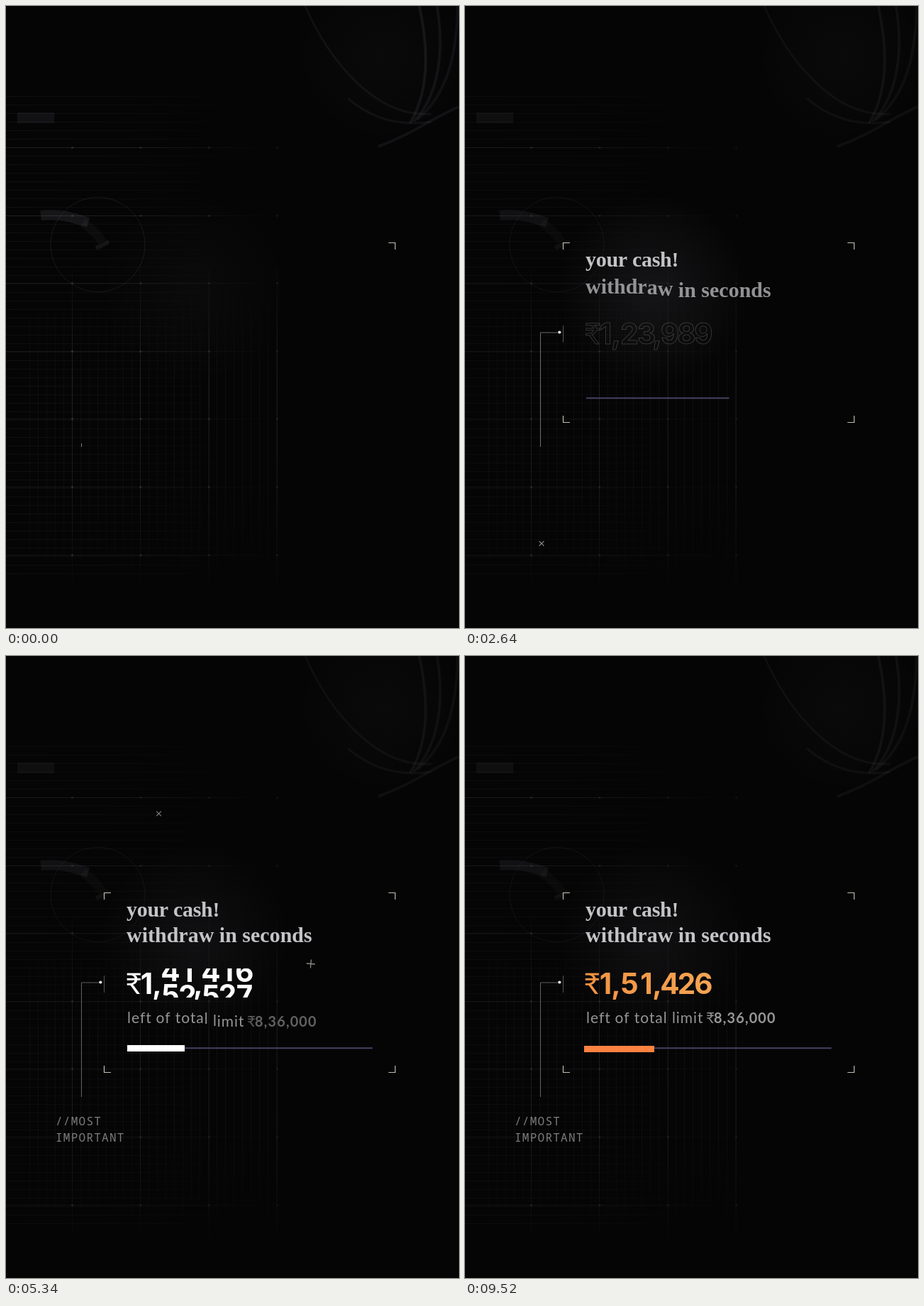
An HTML page with a canvas that plays this animation: 639 by 876 pixels, repeating every 9540 ms.

```html
<!DOCTYPE html>
<html lang="en">
<head>
<meta charset="utf-8">
<title>Withdraw</title>
<style>
html, body { margin: 0; width: 100%; height: 100%; overflow: hidden; background: #050506; }
canvas { display: block; }
</style>
</head>
<body>
<canvas id="stage" width="639" height="876"></canvas>
<script>
const LOOP = 9540, W = 639, H = 876;
const ctx = document.getElementById('stage').getContext('2d');

const SERIF = 'bold 30px "Liberation Serif", serif';
const DIGITS = 'bold 40.5px Inter, sans-serif';
const RUPEE = '41px Lato, "Noto Sans", sans-serif';
const LABEL = '21px Lato, "Noto Sans", sans-serif';
const LABEL_BOLD = 'bold 20px Lato, "Noto Sans", sans-serif';
const MONO = '300 16px "Noto Sans Mono", monospace';

const clamp = v => Math.min(1, Math.max(0, v));
const ramp = (t, start, length) => clamp((t - start) / length);
const easeOut = u => 1 - (1 - u) ** 2;
const easeInOut = u => u < .5 ? 2 * u * u : 1 - 2 * (1 - u) ** 2;
const pulse = (t, peak, width) => clamp(1 - Math.abs(t - peak) / width);
const white = a => `rgba(235,235,245,${a})`;
const mix = (a, b, u) => a.map((v, i) => v + (b[i] - v) * u);
const rgb = c => `rgb(${c.map(Math.round)})`;

function line(points, color, width = 1) {
  ctx.beginPath();
  points.forEach(([x, y]) => ctx.lineTo(x, y));
  ctx.strokeStyle = color;
  ctx.lineWidth = width;
  ctx.stroke();
}

function fade(x0, y0, x1, y1, ...alphas) {
  const g = ctx.createLinearGradient(x0, y0, x1, y1);
  alphas.forEach((a, i) => g.addColorStop(i / (alphas.length - 1), white(a)));
  return g;
}

function drawGlow(x, y, r, alpha) {
  const g = ctx.createRadialGradient(x, y, 0, x, y, r);
  [1, .5, 0].forEach((a, i) => g.addColorStop(i / 2, white(a * alpha)));
  ctx.fillStyle = g;
  ctx.fillRect(x - r, y - r, 2 * r, 2 * r);
}

function drawGrid(k) {
  const rows = fade(0, 0, 330, 0, .03 * k, .022 * k, 0);
  const rowsMajor = fade(0, 0, 390, 0, .06 * k, .05 * k, 0);
  const cols = fade(0, 390, 0, 820, 0, .034, .032, 0);
  const colsMajor = fade(0, 370, 0, 840, .02, .07 * k, .06, 0);
  for (let y = 127.5; y < 800; y += 12) line([[0, y], [330, y]], rows);
  for (let x = 33.5; x < 384; x += 12) line([[x, 390], [x, 820]], cols);
  for (let j = 0; j < 7; j++) {
    const y = Math.round(199 + j * 95.6) + .5;
    line([[0, y], [390, y]], rowsMajor);
    for (let i = 0; i < 4; i++) {
      ctx.fillStyle = white(.07 * k * (1 - i * .15));
      ctx.fillRect(92 + i * 96.4, y - 1.5, 3, 3);
    }
  }
  for (let i = 0; i < 4; i++) {
    const x = Math.round(93 + i * 96.4) + .5;
    line([[x, 370], [x, 840]], colsMajor);
  }
}

function curve(x0, y0, x1, y1, x2, y2, x3, y3, alpha, width) {
  ctx.beginPath();
  ctx.moveTo(x0, y0);
  ctx.bezierCurveTo(x1, y1, x2, y2, x3, y3);
  ctx.strokeStyle = white(alpha);
  ctx.lineWidth = width;
  ctx.stroke();
}

function drawBackdrop(t) {
  ctx.fillStyle = '#050506';
  ctx.fillRect(0, 0, W, H);
  const k = 1.4 - .4 * ramp(t, 0, 1000);
  drawGlow(265, 400, 135, .025 + .075 * ramp(t, 600, 1200) - .05 * ramp(t, 2100, 900));
  drawGrid(k);

  // wire sphere in the top right corner
  drawGlow(530, 72, 120, .02);
  curve(583, 0, 594, 50, 600, 115, 570, 165, .045 * k, 4);
  curve(608, 0, 618, 60, 612, 125, 575, 163, .04 * k, 4);
  curve(637, 0, 636, 70, 622, 125, 580, 160, .035 * k, 4);
  curve(422, 0, 455, 75, 520, 158, 600, 152, .035 * k, 3);
  curve(482, 130, 515, 158, 555, 170, 600, 163, .035 * k, 3);
  curve(639, 142, 605, 155, 575, 180, 525, 198, .04 * k, 4);

  // clock dial and tabs
  ctx.beginPath();
  ctx.arc(129.5, 336, 66.5, 0, 7);
  ctx.strokeStyle = white(.055 * k);
  ctx.lineWidth = 1;
  ctx.stroke();
  ctx.fillStyle = white(.04 * k);
  ctx.fillRect(16, 150, 52, 15);
  curve(49, 295, 80, 292, 97, 299, 116, 305, .05 * k, 14);
  curve(108, 305, 120, 313, 130, 323, 136, 332, .02 * k, 13);
  line([[127, 341], [145, 332]], white(.05 * k), 6);
}

function drawFrame(t) {
  const shown = ramp(t, 400, 500);
  const corner = (x, y, dx, dy, alpha, peak = 0) => {
    const arm = 9.5;
    line([[x + dx * arm, y], [x, y], [x, y + dy * (arm + 11 * peak * (dx < 0))]],
      `rgba(${mix([190, 190, 175], [245, 245, 245], peak)},${alpha})`, 1.2 + peak);
  };
  corner(138.5, 333.5, 1, 1, shown);
  corner(549, 333.5, -1, 1, 1, pulse(t, 2080, 300));
  corner(138.5, 586.5, 1, -1, shown, pulse(t, 4220, 300));
  corner(549, 586.5, -1, -1, shown);

  // pointer: up, then right to the dot
  const up = easeInOut(ramp(t, 0, 1100)), right = easeOut(ramp(t, 1100, 300));
  const tone = 125 - 30 * ramp(t, 2100, 900), gray = rgb([tone, tone, tone]);
  line([[106.5, 621], [106.5, 616 - 156 * up]], gray);
  if (right) line([[106.5, 460], [106.5 + 24 * right, 460]], gray);
  if (t > 1400) {
    ctx.beginPath();
    ctx.arc(133.3, 459.5, 2.1, 0, 7);
    ctx.fillStyle = '#f4f4f4';
    ctx.fill();
  }
  const tick = 12 * easeOut(ramp(t, 2300, 400));
  if (tick) line([[138.5, 462 - tick], [138.5, 462 + tick]], '#55554c');

  const rail = 346 * easeInOut(ramp(t, 1500, 2100));
  if (rail) line([[171, 552.3], [171 + rail, 552.3]], '#47415f', 2);
}

// A plus that turns into a cross, shrinks and fades
function drawSpark(t, x, y, born) {
  const age = t - born;
  if (age < 0 || age > 2300) return;
  const r = 6 - 1.2 * ramp(age, 400, 800);
  ctx.save();
  ctx.translate(x, y);
  ctx.rotate(Math.PI / 4 * easeInOut(ramp(age, 100, 1150)));
  ctx.globalAlpha = ramp(age, 0, 300) * (1 - .8 * ramp(age, 1400, 600)) * (1 - ramp(age, 2050, 250));
  line([[-r, 0], [r, 0]], '#8c8c84', 1.3);
  line([[0, -r], [0, r]], '#8c8c84', 1.3);
  ctx.restore();
}

// Letters wait a little low, then snap up one after another
function drawText(t, str, x, y, font, color, spacing, { at, sweep, fadeTime = 400, lift = 5 }) {
  const alpha = ramp(t, at - 200, fadeTime);
  if (!alpha) return;
  ctx.globalAlpha = alpha;
  ctx.font = font;
  ctx.fillStyle = color;
  ctx.textAlign = 'left';
  [...str].forEach((ch, i) => {
    const up = easeOut(ramp(t, at + sweep * i / str.length, 110));
    const dx = ctx.measureText(str.slice(0, i)).width + i * spacing;
    ctx.fillText(ch, x + dx, y + lift * (1 - up));
  });
  ctx.globalAlpha = 1;
}

function drawHeadings(t) {
  drawText(t, 'your cash!', 170, 367, SERIF, '#c4c4c6', -.3, { at: 1700, sweep: 600, fadeTime: 700 });
  const settle = 2 * (1 - easeOut(ramp(t, 3240, 250)));
  const tone = 200 + 20 * pulse(t, 3240, 500);
  drawText(t, 'withdraw in seconds', 170, 402.5 + settle, SERIF, rgb([tone - 4, tone - 4, tone]), 0,
    { at: 2400, sweep: 600, fadeTime: 600 });
  drawText(t, '//MOST', 70, 661, MONO, '#7c7c7c', 1.25, { at: 3600, sweep: 350 });
  drawText(t, 'IMPORTANT', 70, 684, MONO, '#7c7c7c', 1.25, { at: 3900, sweep: 520 });
  drawText(t, 'left of total limit', 171, 517, LABEL, '#969696', .95, { at: 4900, sweep: 590, fadeTime: 500 });
  drawText(t, '₹', 340, 517, LABEL, '#8f8f8f', 0, { at: 5350, sweep: 50, fadeTime: 300 });
  drawText(t, '8,36,000', 351, 517, LABEL_BOLD, '#979797', 1.1, { at: 5350, sweep: 350, fadeTime: 300 });
}

// Rolling columns: [centre x, final digit, distance at the start]
const COLUMNS = [[232, 5, -3], [256, 1, 2], [289, 4, 5], [312.5, 2, -4], [336.5, 6, 3]];
const FIXED = [['₹', 180], ['1', 198.5], [',', 213], [',', 271]];
const PITCH = 34, BASE = 475.5;

function drawAmount(t) {
  const shown = ramp(t, 2500, 400);
  if (!shown) return;
  const filled = ramp(t, 3450, 450);
  const warm = easeInOut(ramp(t, 6500, 850)), bright = ramp(t, 7440, 450);
  const tint = (a, b) => rgb(mix(mix([255, 255, 255], a, warm), b, warm * bright));
  const paint = ctx.createLinearGradient(170, 0, 348, 0);
  paint.addColorStop(0, tint([222, 124, 58], [243, 147, 66]));
  paint.addColorStop(1, tint([218, 142, 84], [245, 164, 82]));

  ctx.textAlign = 'center';
  const glyph = (ch, x, y) => {
    ctx.font = ch === '₹' ? RUPEE : DIGITS;
    if (filled < 1) {
      ctx.globalAlpha = shown * (1 - filled);
      ctx.strokeStyle = '#85857e';
      ctx.lineWidth = 1;
      ctx.strokeText(ch, x, y);
    }
    ctx.globalAlpha = filled;
    ctx.fillStyle = paint;
    ctx.fillText(ch, x, y);
  };
  FIXED.forEach(([ch, x]) => glyph(ch, x - (ch === '₹' ? warm : 0), BASE));

  const left = 1 - ramp(t, 4560, 1560);
  ctx.save();
  ctx.beginPath();
  ctx.rect(218, 440, 140, 41);
  ctx.clip();
  COLUMNS.forEach(([x, digit, d]) => {
    const pos = digit + d * left ** Math.log2(2 * Math.abs(d));
    const low = Math.floor(pos);
    [low, low + 1].forEach(n => {
      const y = BASE + (n - pos) * PITCH;
      if (Math.abs(y - BASE) < PITCH) glyph(String((n + 10) % 10), x, y);
    });
  });
  ctx.restore();
  ctx.globalAlpha = 1;

  if (t > 4150) {
    const end = 173 + 94 * easeOut(ramp(t, 4200, 1900));
    const start = 171 - 3 * warm;
    ctx.fillStyle = tint([221, 108, 48], [254, 130, 64]);
    ctx.fillRect(start, 548 + warm, end - start, 9);
  }
}

const SPARKS = [[108, 757, 1250], [47, 434, 2900], [322.5, 648.5, 3000], [215.5, 222, 3850], [430, 433.5, 4980]];

function draw(t) {
  drawBackdrop(t);
  drawFrame(t);
  SPARKS.forEach(s => drawSpark(t, ...s));
  drawHeadings(t);
  drawAmount(t);
}

const begin = performance.now();
function tick() {
  draw((performance.now() - begin) % LOOP);
  requestAnimationFrame(tick);
}
tick();
</script>
</body>
</html>
```
